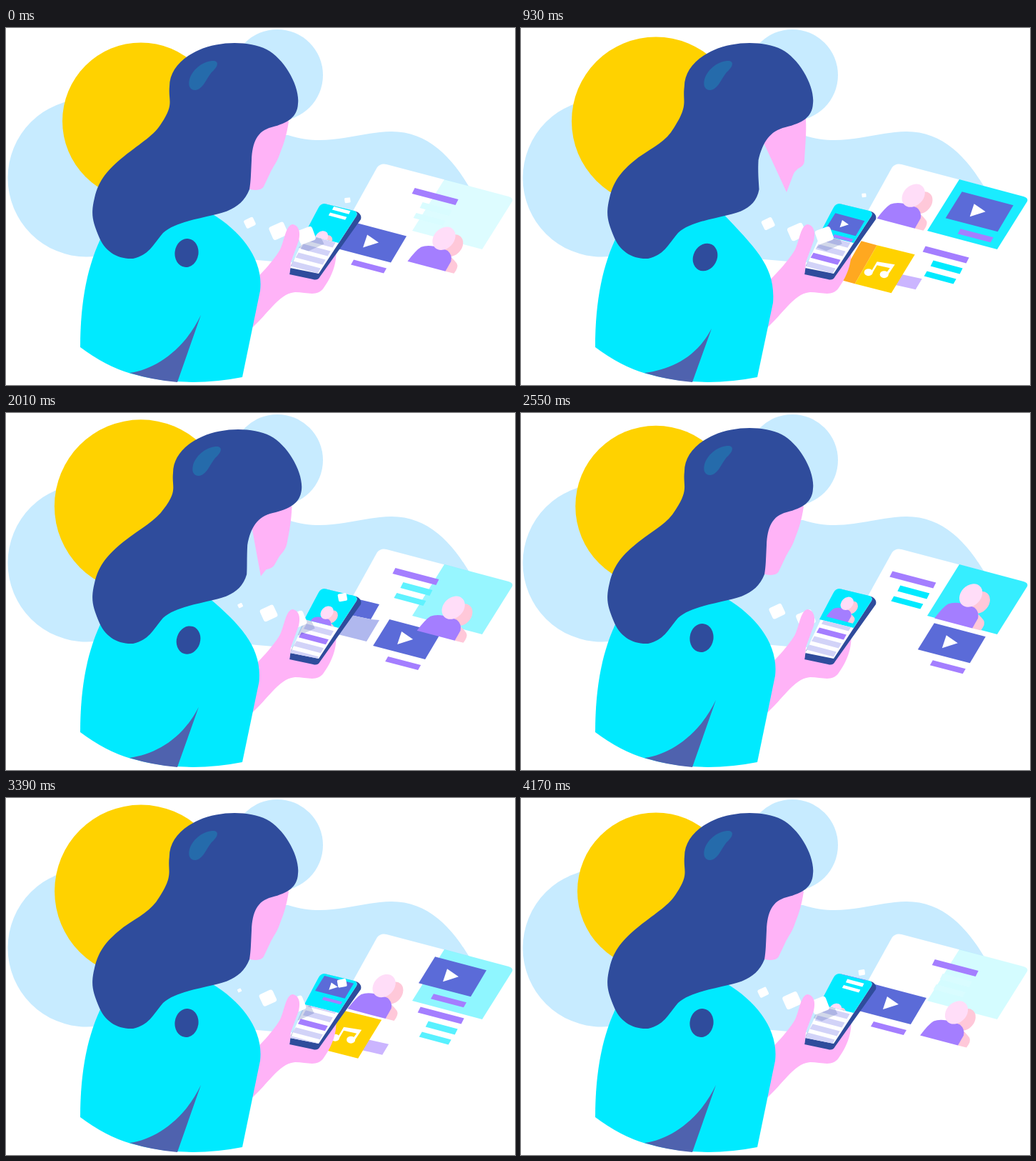
An HTML page that plays this animation: 713 px wide and 500 px high, repeating every 4200 ms.

```html
<!DOCTYPE html>
<html lang="en">
<head>
<meta charset="utf-8">
<title>Sharing cards from a phone</title>
<style>
  html, body { margin: 0; width: 100%; height: 100%; overflow: hidden; background: #fff; }
  svg { display: block; width: 100vw; height: 100vh; }
</style>
</head>
<body>
<svg viewBox="0 0 713 500" preserveAspectRatio="xMidYMid meet">
  <defs>
    <clipPath id="header"><path d="M446 246Q441 246 438 251L418 289L466 301L491 263Q493 258 488 256Z"/></clipPath>
    <clipPath id="list"><path d="M418 289L466 301L438 344L398 336Z"/></clipPath>
    <clipPath id="rightOfPhone"><path d="M500 200L494 268L430 350V420H713V200Z"/></clipPath>
    <g id="person">
      <path fill="#ffc8d9" d="M53 14L65 17Q72 8 69 3Q64 -4 52 -14Z"/>
      <ellipse fill="#ffc8d9" rx="17" ry="13" transform="translate(63 -22) rotate(-50)"/>
      <path fill="#a47eff" d="M0 0L53 14L61 0Q63 -9 56 -15L46 -19Q29 -24 19 -20Q12 -16 0 0Z"/>
      <ellipse fill="#ffddf8" rx="18" ry="14" transform="translate(51 -32) rotate(-45)"/>
    </g>
    <g id="video">
      <path fill="#5b6bd8" d="M0 0L72 19L50 56L-23 37Z"/>
      <path fill="#fff" d="M17 17L33 28L11 35Z"/>
      <path fill="#a47eff" d="M-2 52L44 64L40 71L-6 59Z"/>
    </g>
    <g id="text">
      <path fill="#a47eff" d="M0 0L61 16L57 24L-4 8Z"/>
      <path d="M11 20L52 31L48 39L7 28ZM2 35L43 46L39 53L-2 42Z"/>
    </g>
  </defs>

  <g fill="#c7ebff">
    <circle cx="113" cy="210" r="110.5"/>
    <circle cx="380" cy="66" r="64"/>
    <path d="M300 150L395 150C450 168 490 146 540 145C590 145 625 180 652 228L640 300L470 330Q400 330 340 324C310 320 280 290 260 250Z"/>
  </g>
  <circle id="sun" cx="189" cy="130.5" fill="#ffd200"/>

  <path fill="#fff" d="M520 195Q525 189 533 191L704 236Q711 238 709 243L640 380L445 330Z"/>
  <path id="panel" fill="#00eaff" d="M614 212L704 236Q711 238 709 243L667 310L569 284Z"/>

  <g id="residue">
    <path fill="#5b6bd8" d="M490 260L523 268L511 289L478 282Z"/>
    <path fill="#b0b8ee" d="M511 289L478 282L465 310L505 320L523 290Z"/>
  </g>
  <g clip-path="url(#rightOfPhone)"><g id="music">
    <path fill="#cbb5ff" d="M533 345L565 352L556 367L525 360Z"/>
    <path fill="#ffa820" d="M480 299L502 305L471 359L449 353Z"/>
    <path fill="#ffd200" d="M502 305L555 318L522 372L471 359Z"/>
    <g fill="#fff">
      <ellipse cx="490" cy="343" rx="6" ry="5"/>
      <ellipse cx="512" cy="346" rx="6" ry="5"/>
      <path d="M493 343L502 328L527 332L517 347L514 345L520 337L502 333L496 343Z"/>
    </g>
  </g></g>
  <use id="cardVideo" href="#video"/>
  <use id="cardText" href="#text"/>
  <use id="cardPerson" href="#person"/>

  <path fill="#ffb3f7" d="M335 428C365 405 380 372 405 370C422 370 436 377 445 364C455 350 465 330 462 306L420 300L397 340L335 365Z"/>
  <path fill="#2f4c9c" d="M446 246L491 257Q499 261 497 268L440 348Q437 354 430 352L397 345L399 333Z"/>
  <path fill="#fff" d="M446 246Q441 246 438 251L398 336L438 344L491 263Q493 258 488 256Z"/>
  <g clip-path="url(#header)">
    <path fill="#00eaff" d="M400 240H500V310H400Z"/>
    <use id="miniVideo" href="#video"/>
    <use id="miniText" href="#text" fill="#fff"/>
    <use id="miniPerson" href="#person"/>
  </g>
  <g clip-path="url(#list)">
    <g id="rows"></g>
    <path id="shade" fill="#2f4c9c" opacity=".22" d="M-14 13L14 -9L22 8L0 18Z"/>
  </g>
  <g id="cubes" fill="#fff"></g>
  <path fill="#ffb3f7" d="M335 428L335 365C352 352 378 322 384 310C390 298 392 275 402 275C410 277 413 285 410 298L399 328L397 346L402 370C380 373 365 405 335 428Z"/>

  <path id="body" fill="#00eaff"/>
  <path id="fold" fill="#4f62ae"/>
  <ellipse id="spot" rx="16.5" ry="20" fill="#2f4c9c"/>
  <path id="face" fill="#ffb3f7"/>
  <path id="hair" fill="#2f4c9c"/>
  <path id="shine" fill="#256bab" d="M257 72C262 55 280 45 292 46C299 48 296 55 288 62C280 72 276 86 265 87C257 87 255 80 257 72Z"/>
</svg>

<script>
const LOOP = 4200, STEP = 700, MOVE = 560;
const { PI, sin, cos, abs, exp, floor, sqrt, min, max } = Math;
const $ = id => document.getElementById(id);
const apply = (el, attrs) => { for (const k in attrs) el.setAttribute(k, attrs[k]); };
const set = (id, attrs) => apply($(id), attrs);
const clamp = x => max(0, min(1, x));
const smooth = x => { x = clamp(x); return x * x * (3 - 2 * x); };
const mix = (a, b, k) => a + (b - a) * k;
const mod = (x, n) => ((x % n) + n) % n;
const move = (x, y, scale = 1) => `translate(${x.toFixed(2)} ${y.toFixed(2)}) scale(${scale})`;

// Moves every point of a path through fn(x, y).
const warp = (path, fn) => path.replace(/(\d+) (\d+)/g, (_, x, y) => fn(+x, +y).map(v => v.toFixed(2)).join(' '));
// Blends two paths of the same structure.
function blend(a, b, k) {
  const target = b.match(/\d+/g);
  let i = 0;
  return a.replace(/\d+/g, v => mix(+v, +target[i++], k).toFixed(2));
}

const HAIR = `M229 82C229 60 245 42 270 31C300 18 340 18 365 30C390 43 412 82 409 106C408 125 395 133 372 139
  C352 144 345 160 344 185C343 205 343 215 341 226C332 250 310 258 290 262C265 268 235 273 220 287
  C205 305 200 318 178 323C155 324 138 312 130 292C122 272 118 262 124 238C130 212 143 198 165 180
  C190 160 208 150 218 133C236 106 227 102 229 82Z`;
const FACE_BACK = 'M345 150L380 120L396 131C393 150 390 160 384 175C380 188 374 194 370 203L361 222Q357 229 342 226L335 223Z';
const FACE_SIDE = 'M335 150L385 120L399 127C400 150 398 165 397 186C397 192 392 195 388 197C384 201 382 203 380 209L372 230Q367 237 350 233L325 226Z';
const BODY_BACK = 'M135 290C115 330 104 380 104 447Q140 474 175 484Q250 505 331 489L356 368C361 325 330 285 288 260Z';
const BODY_SIDE = 'M135 290C115 330 104 380 104 447Q140 474 175 484Q250 505 331 489L353 385C357 335 330 310 283 260Z';
const FOLD_BACK = 'M173 483C210 478 250 450 273 402L240 496Q205 493 173 483Z';
const FOLD_SIDE = 'M173 483C210 478 245 462 267 421L240 496Q205 493 173 483Z';

const addAll = (parent, n, tag) => Array.from({ length: n }, () =>
  $(parent).appendChild(document.createElementNS('http://www.w3.org/2000/svg', tag)));
const cubes = addAll('cubes', 5, 'rect');
const rows = addAll('rows', 7, 'path');
rows.forEach(row => apply(row, { d: 'M0 0L38 10L34 17L-4 7Z' }));

// Six eased steps per loop; the beat runs a little early halfway through.
function stepAt(t) {
  let step = 0;
  for (let k = 0; k <= LOOP / STEP; k++) {
    const centre = 10 + STEP * k - 210 * sin(PI * k * STEP / LOOP) ** 8;
    step += smooth((t - centre) / MOVE + .5);
  }
  return step;
}

// Lap around the four slots: top left, bottom left, bottom right, top right.
function lap(step) {
  const x = mod(step, 3);
  return x < 1 ? 2 * x : x + 1;
}
function slot(i) {
  const [u, v] = i < 1 ? [0, i] : i < 2 ? [i - 1, 1] : i < 3 ? [1, 3 - i] : [4 - i, 0];
  return [89 * u - 43 * v, 23 * u + 72 * v];
}

function drawCards(step) {
  const x = mod(step, 3), part = x % 1;
  const place = (id, i, x0, y0) => {
    const [dx, dy] = slot(i);
    set(id, { transform: move(x0 + dx, y0 + dy) });
  };
  const textLap = lap(step + 2);
  place('cardVideo', lap(step), 530, 204);
  place('cardPerson', lap(step + 1), 496, 266);
  place('cardText', textLap, 526, 212);
  const pale = clamp(2 - 2 * abs(textLap - 3)) * .85;
  set('cardText', { fill: `rgb(${255 * pale},${mix(234, 255, pale)},255)` });
  set('panel', { opacity: .13 + .87 * (2 * part - 1) ** 2 });

  // The music card drifts left and tucks in behind the phone.
  const late = x < .5 ? x + 3 : x, drift = max(-98, -110 * (late - 1.94));
  set('music', { transform: move(drift, .255 * drift), opacity: clamp((late - 1.4) / .3) * clamp((3.4 - late) / .3) });
  set('residue', { opacity: clamp(1.2 - 5 * abs(x - .8)) });

  // The phone header shows whichever card rests in the top right slot.
  const mini = (id, rest, x0, y0) => {
    const off = mod(rest - x + 1.5, 3) - 1.5;
    set(id, { transform: move(x0 - 25 * off, y0 + 45 * off, .57), visibility: abs(off) < 1 ? 'visible' : 'hidden' });
  };
  mini('miniText', 0, 441, 260);
  mini('miniPerson', 1, 426, 288);
  mini('miniVideo', 2, 441, 258);

  const scroll = 2 * x;
  rows.forEach((row, i) => {
    const n = floor(scroll) - 1 + i, y = n - scroll;
    const purple = mod(n, 3) === 2 && abs(part - .5) > .15;
    apply(row, { transform: move(417 - 7 * y, 302 + 12 * y), fill: purple ? '#a47eff' : '#d2d3f8' });
  });
}

const bezier = (u, a, b, c, d) => {
  const w = 1 - u;
  return w * w * w * a + 3 * w * w * u * b + 3 * w * u * u * c + u * u * u * d;
};

function drawCubes(t) {
  const lag = .21 * min(1, 3 * sin(PI * t / LOOP));
  const phase = mod(.42 + t / STEP - lag, 1);
  cubes.forEach((cube, i) => {
    const u = min(1, (i + phase) / 4.7);
    const x = bezier(u, 325, 385, 460, 483), y = bezier(u, 269, 280, 330, 224);
    // Cubes sink into the screen and come out again at its top edge.
    const sunk = u > .58 && u < .84;
    const size = sunk ? 0 : 28 * sqrt(max(0, sin(PI * u))) * (1 - .35 * u);
    apply(cube, { x: -size / 2, y: -size * .44, width: size, height: size * .88, rx: size * .16,
      transform: `translate(${x} ${y}) rotate(${mix(-26, -5, u * u)})` });
    if (i === 2) set('shade', { transform: move(x + 3, y + 4), visibility: sunk ? 'hidden' : 'visible' });
  });
}

function drawWoman(t) {
  const turn = smooth((t - 500) / 400) - smooth((t - 1740) / 550);
  const lean = t > LOOP / 3 ? 4 * turn * (1 - turn) : 0;
  const sway = (1 - cos(2 * PI * t / (LOOP / 2))) / 2;
  const near = (x, y, cx, cy, r) => exp(-((x - cx) ** 2 + (y - cy) ** 2) / r ** 2);
  set('hair', { d: warp(HAIR, (x, y) => {
    const wave = sway * near(x, y, 205, 145, 38);
    const cheek = turn * near(x, y, 343, 195, 45);
    const nod = lean * clamp((170 - y) / 60);
    return [x - 5 * wave - 12 * cheek + 5 * nod, y + 9 * wave + 2 * nod];
  }) });
  set('face', { d: blend(FACE_BACK, FACE_SIDE, turn), transform: move(3 * lean, 2 * lean) });
  set('shine', { transform: move(5 * lean, lean) });
  set('body', { d: blend(BODY_BACK, BODY_SIDE, turn) });
  set('fold', { d: blend(FOLD_BACK, FOLD_SIDE, turn) });
  set('spot', { transform: `translate(${mix(253, 258, turn)} ${mix(315, 321, turn)}) rotate(${mix(8, 28, turn)})` });
}

function drawSun(t) {
  const beat = mod(t / STEP, 2);
  const swell = (1 - cos(PI * (beat % 1) ** .9)) / 2;
  set('sun', { r: 110 + 11.5 * (beat < 1 ? swell : 1 - swell) });
}

function draw(t) {
  drawSun(t);
  drawCards(stepAt(t));
  drawCubes(t);
  drawWoman(t);
}

const start = performance.now();
function tick() {
  draw(mod(performance.now() - start, LOOP));
  requestAnimationFrame(tick);
}
tick();
</script>
</body>
</html>
```
